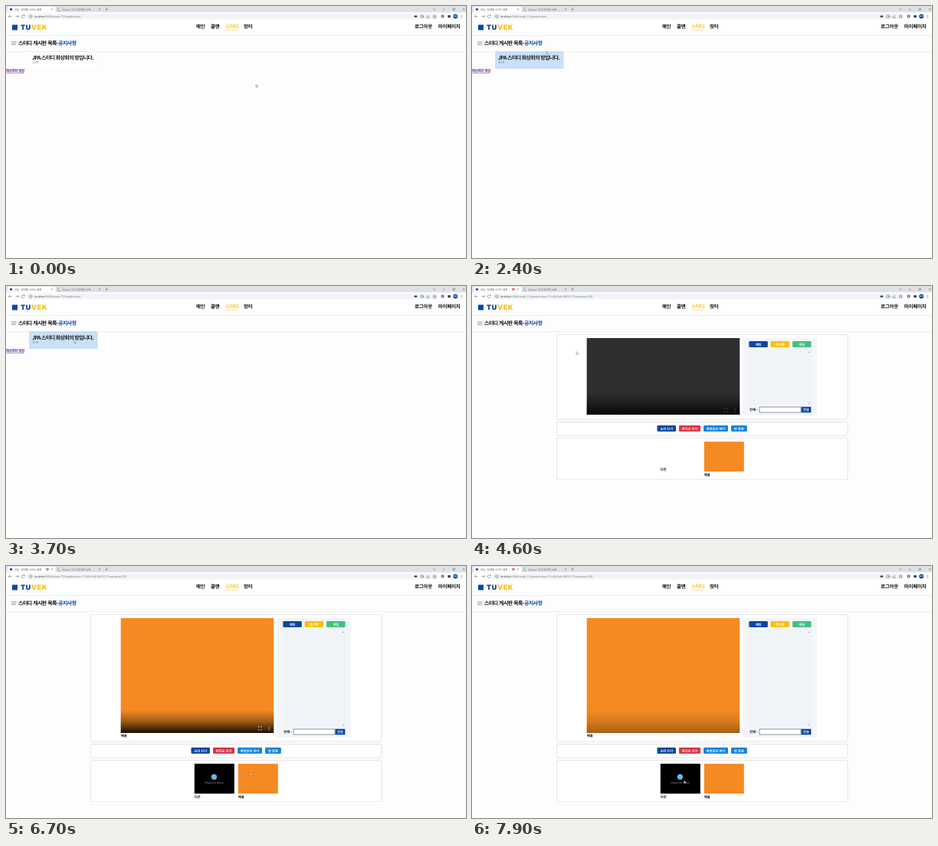
These frames come from a looping animation (600x329 px, 8000 ms). An HTML page:

```html
<!DOCTYPE html>
<html lang="ko">
<head>
<meta charset="utf-8">
<style>
html, body { margin: 0; width: 100%; height: 100%; overflow: hidden; background: #fdfdfe; }
svg { display: block; width: 100vw; height: 100vh; }
text { font-family: "Noto Sans CJK KR", "Noto Sans CJK", sans-serif; font-weight: 700; text-rendering: geometricPrecision; white-space: pre; }
.ui { font-family: Roboto, "Noto Sans CJK KR", sans-serif; font-weight: 400; }
.nav { letter-spacing: -.25px; }
.head { letter-spacing: -.55px; font-weight: 900; }
.title { letter-spacing: -.65px; font-weight: 900; }
.link { letter-spacing: -.4px; }
.brand { font-family: Inter, sans-serif; font-weight: 900; letter-spacing: .6px; }
.msg { font-family: "Noto Sans", sans-serif; font-weight: 400; }
.line { fill: none; stroke: #6b6f74; stroke-width: .6; }
.card { fill: #fff; stroke: #e2e3e6; stroke-width: .6; filter: drop-shadow(0 .8px .6px #0003); }
#room { stroke: none; }
</style>
</head>
<body>
<svg id="stage" viewBox="0 0 600 329" preserveAspectRatio="none"></svg>
<script>
const BLUE = '#0b48a0', YELLOW = '#fbc011', ORANGE = '#f58a22', SKY = '#1485dd';
const HOVER = 2250, SWITCH = 4000, LOADED = 4800, PICK = 6700, LOOP = 8000;

const rect = (x, y, w, h, fill, extra = '') =>
  `<rect x="${x}" y="${y}" width="${w}" height="${h}" fill="${fill}" ${extra}/>`;
const text = (x, y, size, str, fill = '#111', extra = '') =>
  `<text x="${x}" y="${y}" font-size="${size}" fill="${fill}" ${extra}>${str}</text>`;
const circle = (x, y, r, fill) => `<circle cx="${x}" cy="${y}" r="${r}" fill="${fill}"/>`;
const line = (d, extra = '') => `<path class="line" d="${d}" ${extra}/>`;
const group = (id, ...parts) => `<g id="${id}">${parts.join('')}</g>`;
const card = (y, h, id = '') => rect(110.5, y, 379.3, h, '#fff', `class="card" rx="1.5" id="${id}"`);
const button = (x, y, w, str, fill) => rect(x, y, w, 8, fill, 'rx="1.3"') +
  text(x + w / 2, y + 5.6, 4.2, str, '#fff', 'text-anchor="middle"');
const ui = 'class="ui"', nav = 'class="nav"';

const browser = group('browser',
  rect(0, 0, 600, 8.5, '#dee1e6'),
  '<path d="M1 8.5Q2 8 2 7V2.5Q2 1 3.5 1H63Q64.5 1 64.5 2.5V7Q64.5 8 65.5 8.5Z" fill="#fff"/>',
  circle(6.5, 4.3, 1.6, BLUE),
  text(11, 5.6, 3.4, '모임 - 함께할 스터디 블록', '#555', ui),
  line('M59 3.3l2 2m0-2l-2 2M121 3.3l2 2m0-2l-2 2M129.5 4.3h3.4M131.2 2.6v3.4', 'stroke-width=".5"'),
  line('M70 2.6a2 2 0 1 0 1 3'),
  text(73, 5.6, 3.4, 'Velunor 10 전체 화면 녹화: ...', '#666', ui),
  line('M557 3.5l1.5 1.3l1.5-1.3M569.8 4.2h2.6M583 3h2.4v2.4h-2.4ZM596 3l2.4 2.4m0-2.4l-2.4 2.4'),
  rect(0, 8.5, 600, 10.5, '#fff'),
  rect(26, 10, 538, 7.5, '#f1f3f4', 'rx="3.7"'),
  line('M7.5 13.6h-4m1.6-1.7l-1.7 1.7l1.7 1.7M12.5 13.6h4m-1.6-1.7l1.7 1.7l-1.7 1.7M24 12.6a2 2 0 1 0 .1 1.9M24.3 11.4v1.5h-1.5'),
  line('M30.5 13.6a1.8 1.8 0 1 0 3.6 0a1.8 1.8 0 1 0-3.6 0M32.3 13.2v1.4'),
  `<text class="ui" x="37" y="14.9" font-size="3.5" fill="#777"><tspan fill="#444">localhost</tspan>:3000/study/71/board/rooms<tspan id="query"></tspan></text>`,
  rect(532.5, 12.4, 3.6, 2.4, '#333', 'rx=".8"'),
  line('M541 12h3v3h-3ZM543 13.5h1.6v1.6M549 12.8v2.4h3v-1.4M550.3 13.6l2-2M559 11.6l.6 1.4h1.5l-1.2 1l.5 1.5l-1.4-.9l-1.4.9l.5-1.5l-1.2-1h1.5Z'),
  circle(569.5, 13.6, 2, '#705060'), circle(569.5, 13.6, .8, '#fff'),
  rect(576.3, 12, 3.4, 3.2, '#333', 'rx=".7"'),
  circle(586.2, 13.6, 3, '#12579b'),
  text(586.2, 14.4, 2.2, '도하', '#fff', 'text-anchor="middle"'),
  [11.9, 13.6, 15.3].map(y => circle(594.5, y, .5, '#5f6368')).join(''),
  group('record', circle(54, 4.3, 1.7, '#d4453d'), circle(54, 4.3, .7, '#fff')));

const header = group('header',
  rect(0, 19, 600, 19, '#fff'),
  rect(0, 38, 600, .7, '#e6e7e9'),
  rect(0, 59, 600, .6, '#e6e7e9'),
  rect(8, 24.5, 7, 7, BLUE),
  `<text class="brand" x="19" y="31.2" font-size="9" fill="${BLUE}">TU<tspan fill="${YELLOW}">VEK</tspan></text>`,
  [[248, '메인'], [267, '콜맨'], [310, '장터'], [533, '로그아웃'], [563.8, '마이페이지']]
    .map(([x, s]) => text(x, 29.2, 6.5, s, '#111', nav)).join(''),
  text(286, 29.2, 6.5, '스터디', YELLOW, nav),
  rect(286, 31.3, 17, .7, '#fbd976'),
  line('M7 46.6h6.5M7 48.6h6.5M7 50.6h6.5'),
  `<text class="head" x="16" y="51" font-size="7" fill="#111">스터디 게시판 목록-<tspan fill="${BLUE}">공지사항</tspan></text>`);

const list = group('list',
  rect(30, 59.6, 89.3, 22.4, '#fff', 'id="room" class="card" rx="1"'),
  text(34, 69.6, 7, 'JPA 스터디 화상회의 방입니다.', '#1b1b1b', 'class="title"'),
  text(34.3, 75, 4.3, '도하', '#777', 'style="font-weight:400"'),
  text(0, 86, 4.6, '화상회의 생성', '#551a8b', 'class="link" text-decoration="underline"'));

const meeting = group('meeting',
  card(63.5, 165.5, 'mainCard'),
  rect(149.7, 68, 199.5, 150, '#000', 'id="video"'),
  '<g id="cam" transform="translate(149.7 68)"><g id="notice">',
  circle(98.5, 66, 14, '#6db5ea'),
  text(99.5, 98.5, 11.5, 'Please run oRLun', '#b9b9b9', 'class="msg" text-anchor="middle"'),
  '</g></g>',
  group('controls',
    rect(149.7, 188, 199.5, 30, 'url(#fade)', 'id="shade"'),
    group('icons',
      line('M329.2 211v-1.4h1M331.8 209.6h1v1.4M332.8 213v1.4h-1M330.2 214.4h-1v-1.4', 'style="stroke:#fff"'),
      [210, 212, 214].map(y => circle(343, y, .6, '#fff')).join(''))),
  text(149.7, 223.4, 4.3, '', '#111', 'id="speaker"'),
  rect(353, 68, 97, 156, '#f3f5f8', 'id="panel"'),
  button(361.3, 72, 24.5, '채팅', BLUE),
  button(389.6, 72, 24.5, '참가자', YELLOW),
  button(418, 72, 24.5, '파일', '#3fc27e'),
  rect(361.3, 84, 81, 125.5, '#f0f4f9', 'id="chat"'),
  '<path d="M438.8 87l1.2-1.6l1.2 1.6Z" fill="#999"/>',
  group('lower',
    '<path d="M438.8 207l1.2 1.6l1.2-1.6Z" fill="#999"/>',
    text(362, 218, 4.3, '전체 -'),
    rect(375, 213, 54, 7, '#fff', 'stroke="#555" stroke-width=".6"'),
    rect(429.5, 212.7, 12.8, 7.6, BLUE),
    text(435.9, 218, 4.2, '전송', '#fff', 'text-anchor="middle"'),
    card(232.7, 17.3),
    button(241.5, 237, 24.5, '소리 끄기', BLUE),
    button(270, 237, 28, '비디오 끄기', '#dd3545'),
    button(302, 237, 32, '화면공유 하기', SKY),
    button(338, 237, 20.8, '방 종료', SKY),
    card(254, 53.7),
    group('thumb', rect(245.8, 258.2, 52, 39, '#000'),
      '<use href="#notice" transform="translate(245.8 258.2) scale(.26)"/>'),
    text(245.8, 303, 4.3, '다온', '#111', 'id="thumbName"'),
    rect(302.8, 258.2, 52, 39, ORANGE),
    text(302.8, 303, 4.3, '해율')));

const stage = document.getElementById('stage');
stage.innerHTML = `<defs><linearGradient id="fade" x2="0" y2="1">
  <stop offset="0" stop-color="#000" stop-opacity="0"/>
  <stop offset=".5" stop-color="#000" stop-opacity=".35"/>
  <stop offset="1" stop-color="#000" stop-opacity=".9"/></linearGradient></defs>` +
  rect(0, 0, 600, 329, '#fdfdfe') + browser + header + list + meeting +
  '<path id="cursor" d="M0 0V3.8L.9 3L1.6 4.4L2.2 4.1L1.6 2.8H2.8Z" fill="#fff" stroke="#555" stroke-width=".4"/>';

const el = {};
stage.querySelectorAll('[id]').forEach(e => el[e.id] = e);
const set = (id, attrs) => Object.entries(attrs).forEach(([k, v]) => el[id].setAttribute(k, v));
const show = (id, on) => el[id].style.display = on ? '' : 'none';
const clamp = v => Math.min(1, Math.max(0, v));

// time, x, y of the pointer tip
const path = [
  [0, 326, 102], [1550, 326, 102], [2350, 97, 58.5], [2500, 97, 58.5], [3200, 89, 71],
  [4100, 89, 71], [4600, 136, 85.5], [5450, 250.5, 115.5], [5600, 250.5, 115.5],
  [6200, 292, 248], [6600, 318, 270], [7250, 318, 270], [7750, 276.5, 280], [LOOP, 276.5, 280]
];

function pointer(t) {
  const i = path.findIndex(p => p[0] > t);
  const [a, b] = [path[i - 1], path[i]];
  let k = (t - a[0]) / (b[0] - a[0]);
  k = k * k * (3 - 2 * k);
  return [a[1] + (b[1] - a[1]) * k, a[2] + (b[2] - a[2]) * k];
}

function draw(t) {
  const inRoom = t >= SWITCH, loaded = t >= LOADED, picked = t >= PICK;
  const shift = loaded ? 0 : -55;
  show('list', !inRoom);
  show('meeting', inRoom);
  show('record', inRoom);
  show('cam', loaded && !picked);
  show('thumb', loaded);
  el.query.textContent = inRoom ? '/71100014401487217?username=다온' : '';
  el.speaker.textContent = !loaded ? '' : picked ? '해율' : '다온';
  el.room.style.fill = t >= HOVER ? '#c9e1f7' : '#fff';
  set('mainCard', { height: 165.5 + shift });
  set('panel', { height: 156 + shift });
  set('chat', { height: 125.5 + shift });
  set('video', { height: loaded ? 150 : 100, fill: picked ? ORANGE : loaded ? '#000' : '#302e2f' });
  set('controls', { transform: `translate(0 ${loaded ? 0 : -50})` });
  set('lower', { transform: `translate(0 ${shift})` });
  set('thumbName', { y: loaded ? 303 : 296 });

  const fade = picked ? 1 - .65 * clamp((t - 7400) / 500) : 1 - clamp((t - 5900) / 300);
  set('shade', { opacity: fade });
  set('icons', { opacity: loaded ? clamp((fade - .4) / .6) : .35 });
  set('record', { opacity: .65 + .35 * Math.cos((t - 4600) / 1100 * 2 * Math.PI) });
  set('cursor', { transform: `translate(${pointer(t)})` });
}

const start = performance.now();
function tick() {
  draw((performance.now() - start) % LOOP);
  requestAnimationFrame(tick);
}
tick();
</script>
</body>
</html>
```
